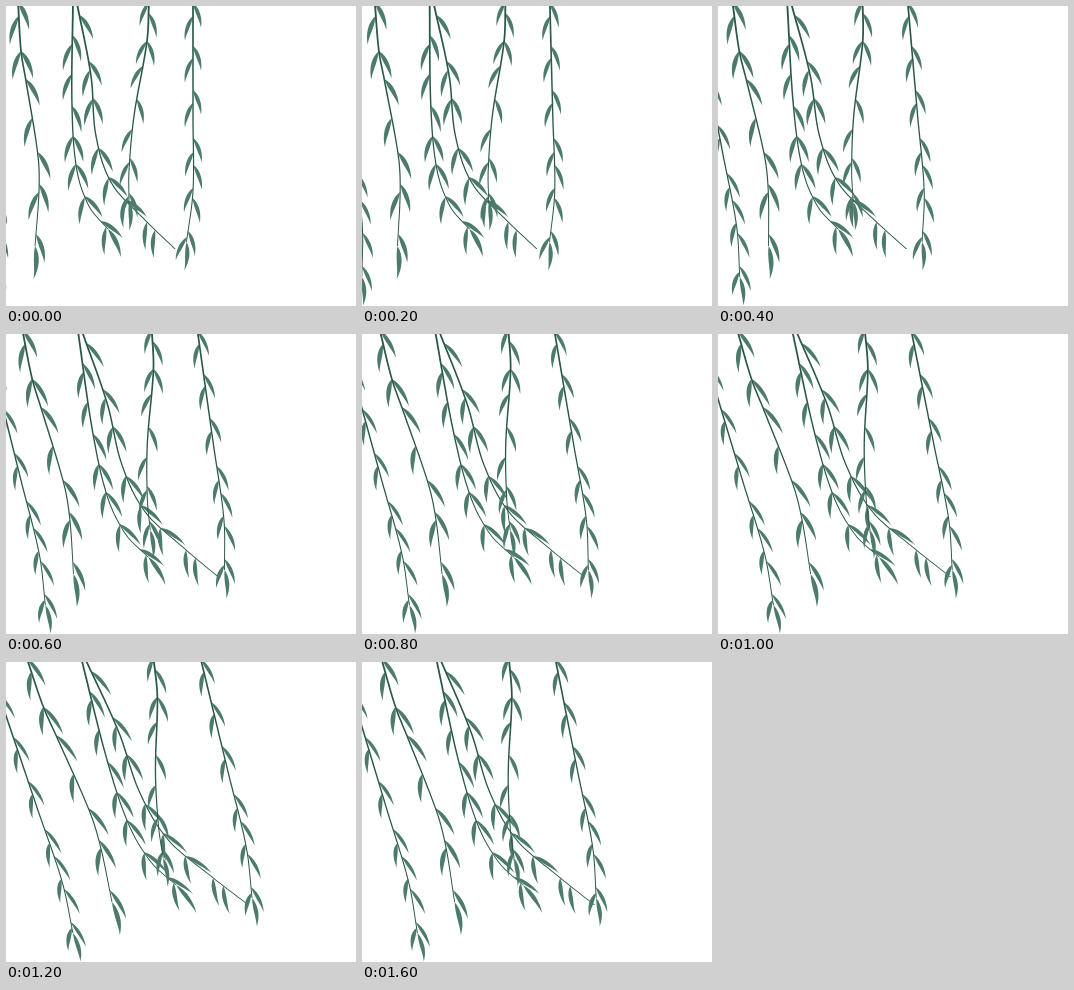
Write an HTML page that moves like this. It is 350 px wide and 300 px high and loops after 1800 ms.

```html
<!DOCTYPE html>
<html lang="en">
<head>
<meta charset="utf-8">
<title>Willow</title>
<style>
html, body { margin: 0; width: 100%; height: 100%; overflow: hidden; background: #fff; }
svg { display: block; width: 100vw; height: 100vh; }
.leaf { fill: #4c7b6d; }
.stem { fill: #2a5848; }
</style>
</head>
<body>
<svg id="stage" viewBox="0 0 350 300"></svg>
<script>
const NS = 'http://www.w3.org/2000/svg';
const stage = document.getElementById('stage');
const LOOP = 1800;
const STEP = 200;
const PIVOT = 35;   // branches swing from this far above the stage
const SPREAD = 18;  // angle between leaf and stem, in degrees
const REST = 6;     // last step of the swing, held before it returns

// stem: key points at rest; left, right: heights where leaves grow
const straight = {
  stem: [[187, -40], [187, 110], [187, 185], [180.5, 236]],
  left: [10, 52, 97, 146, 182, 231], right: [-3, 40, 84, 132, 159, 192, 225], size: 26
};
const arched = {
  stem: [[67, -5], [66, 100], [71, 165], [84, 202], [102, 223]],
  left: [38, 68, 130, 158, 191, 221], right: [29, 100, 130, 158, 190, 215], size: 28
};
const sweeping = {
  stem: [[70.5, -5], [85, 70], [90, 130], [106, 178], [140, 215], [169, 243]],
  left: [64, 93, 142, 172, 194, 216, 224], right: [9, 55, 92, 142, 171, 194], size: 28, bareEnd: true
};
const slanted = {
  stem: [[143, -5], [141, 35], [128, 110], [123, 165], [123, 196]],
  left: [-4, 35, 60, 123, 156, 190], right: [7, 35, 93, 152, 187], size: 26
};
const wavy = {
  stem: [[12, -5], [15, 45], [20, 75], [32, 150], [33, 185], [29, 240]],
  left: [10, 45, 112, 186], right: [-4, 45, 73, 146, 178, 228], size: 30
};

// lean: shear at rest; swing: added shear; pace: progress at steps 2, 3 and 5
const branches = [
  { shape: straight, dx: -217, dy: 35, lean: .088, swing: .25, pace: [.41, .64, .85] },
  { shape: wavy, swing: .28, pace: [.28, .5, .826] },
  { shape: arched, swing: .264, pace: [.265, .59, .865] },
  { shape: sweeping, swing: .264, pace: [.265, .59, .865] },
  { shape: slanted, swing: .148, pace: [.36, .62, .85] },
  { shape: straight, swing: .242, pace: [.36, .58, .82] }
];

function add(parent, cls, d) {
  const el = document.createElementNS(NS, 'path');
  el.setAttribute('class', cls);
  el.setAttribute('d', d);
  parent.append(el);
}

// Smooth curve x(y) through the points
function curve(pts) {
  const last = pts.length - 1;
  const slope = i => {
    const a = pts[Math.max(0, i - 1)], b = pts[Math.min(last, i + 1)];
    return (b[0] - a[0]) / (b[1] - a[1]);
  };
  return y => {
    let i = 0;
    while (i < last - 1 && y > pts[i + 1][1]) i++;
    const [x0, y0] = pts[i], [x1, y1] = pts[i + 1];
    const h = y1 - y0, u = (y - y0) / h, v = 1 - u;
    return x0 * v * v * (1 + 2 * u) + x1 * u * u * (3 - 2 * u) +
      h * u * v * (slope(i) * v - slope(i + 1) * u);
  };
}

// Angle is measured from straight down, positive to the right
function leafPath(x, y, angle, size, side) {
  const a = angle * Math.PI / 180;
  const dx = size * Math.sin(a), dy = size * Math.cos(a);
  const at = (along, out) =>
    `${(x + dx * along + dy * out * side).toFixed(2)} ${(y + dy * along - dx * out * side).toFixed(2)}`;
  return `M${at(0, 0)}C${at(.28, .2)} ${at(.68, .16)} ${at(1, 0)}` +
    `C${at(.7, .04)} ${at(.4, -.06)} ${at(0, 0)}Z`;
}

function stemPath(pts, xAt) {
  const top = pts[0][1], end = pts[pts.length - 1][1];
  const left = [], right = [];
  for (let i = 0; i <= 60; i++) {
    const y = top + (end - top) * i / 60, x = xAt(y);
    const half = (.95 - .5 * i / 60) * Math.hypot(1, xAt(y + .5) - xAt(y - .5));
    left.push(`${(x - half).toFixed(2)} ${y.toFixed(2)}`);
    right.unshift(`${(x + half).toFixed(2)} ${y.toFixed(2)}`);
  }
  return 'M' + left.concat(right).join('L') + 'Z';
}

function grow(parent, { stem, left, right, size, bareEnd }) {
  const xAt = curve(stem);
  const stemAngle = y => Math.atan(xAt(y) - xAt(y - 1)) * 180 / Math.PI;
  const leaf = (y, side) => {
    const bend = stemAngle(y);
    // leaves on the outer side follow the stem, the others hang
    const follow = bend * side > 0 ? 1 : .35;
    const angle = Math.max(-52, Math.min(52, SPREAD * side + bend * follow));
    add(parent, 'leaf', leafPath(xAt(y), y, angle, size, side));
  };
  left.forEach(y => leaf(y, -1));
  right.forEach(y => leaf(y, 1));
  if (!bareEnd) {
    const [x, y] = stem[stem.length - 1];
    add(parent, 'leaf', leafPath(x, y, stemAngle(y) * .6, size * 1.1, 1));
  }
  add(parent, 'stem', stemPath(stem, xAt));
}

for (const branch of branches) {
  branch.el = document.createElementNS(NS, 'g');
  stage.append(branch.el);
  grow(branch.el, branch.shape);
}

function progress([a, b, c], step) {
  return [0, a * .3, a, b, (b + c) / 2, c, 1][step];
}

function draw(time) {
  const tick = Math.floor((time % LOOP) / STEP);
  const step = tick === 8 ? REST - 1 : Math.min(tick, REST);
  for (const { el, swing, pace, lean = 0, dx = 0, dy = 0 } of branches) {
    const k = lean + swing * progress(pace, step);
    el.setAttribute('transform', `matrix(1 0 ${k} 1 ${dx + k * (dy + PIVOT)} ${dy})`);
  }
}

function loop() {
  draw(performance.now());
  requestAnimationFrame(loop);
}
loop();
</script>
</body>
</html>
```
